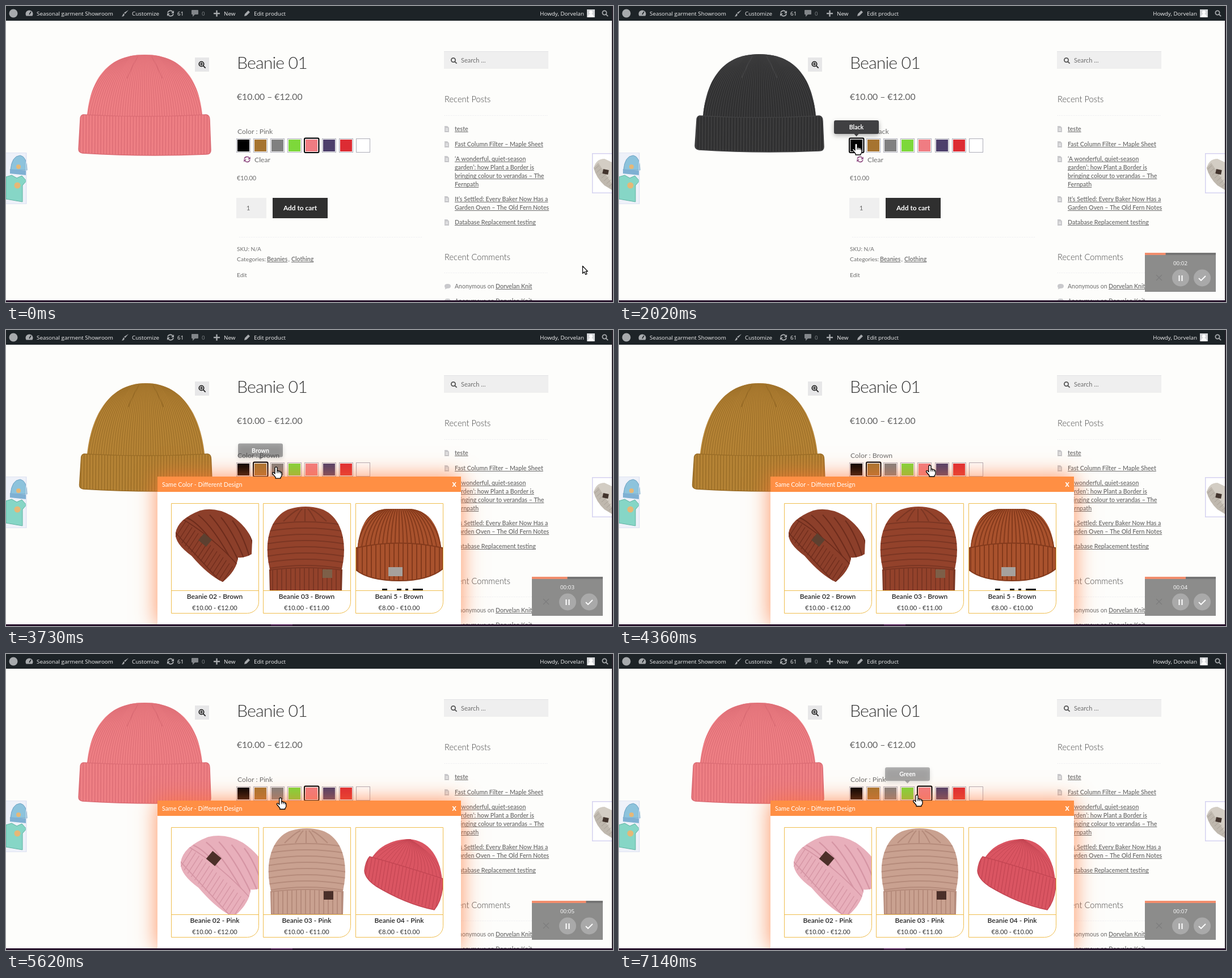
Recreate the animation shown at these times as an HTML page with a canvas. Size 1070x523 px, loop 7.21 s.

```html
<!DOCTYPE html>
<html lang="en">
<head>
<meta charset="utf-8">
<title>Beanie 01</title>
<style>
html, body { margin: 0; width: 100%; height: 100%; overflow: hidden; background: #fdfdfb; }
canvas { display: block; width: 1070px; height: 523px; }
</style>
</head>
<body>
<canvas id="stage" width="1070" height="523"></canvas>
<script>
const ctx = document.getElementById('stage').getContext('2d');
const LOOP = 7210;
const LATO = 'Lato, "Open Sans", sans-serif';
const OPEN = '"Open Sans", "Noto Sans", sans-serif';
const GREY = '#6d6d6d';

// Mouse path: time, x, y
const MOUSE = [
  [0, 1016, 459], [200, 1016, 459], [1050, 446, 262], [1250, 446, 262],
  [1600, 418, 243], [2350, 418, 243], [2950, 455, 243], [3500, 455, 243],
  [4250, 548, 239], [5250, 547, 239], [5950, 431, 267], [6400, 431, 267],
  [6750, 480, 246], [7140, 525, 249], [7210, 529, 249]
];
const PROGRESS = [[0, 4], [1200, 24], [3160, 54], [4360, 72], [5050, 86], [6250, 106], [7130, 125]];
// Tooltips: swatch, start, end
const TIPS = [
  [0, 1550, 2350], [1, 2600, 3650], [2, 3800, 3900], [3, 4000, 4120], [4, 4400, 5350],
  [1, 6480, 6600], [2, 6640, 6830], [3, 6890, 7050]
];
const SWATCHES = [
  ['Black', '#000'], ['Brown', '#a67430'], ['Grey', '#808080'], ['Green', '#7dd83a'],
  ['Pink', '#f07c82'], ['Purple', '#4d3f6b'], ['Red', '#dd2c33'], ['White', '#fff']
];
const MAIN = {
  Pink: [244.5, 86, 102, 193, 116.5, 262, '#ee7f84', '#dc6d75'],
  Black: [247.5, 85, 100, 195, 113.5, 256, '#303031', '#424243'],
  Brown: [246.5, 94, 104, 220, 117, 283, '#b58335', '#9a6d27']
};
const DESIGNS = {
  Black: {
    slouch: { fill: '#202126', rib: '#34353b', patch: '#8a5a3c', x: 302, y: 322, size: 1, mark: 55 },
    tall: ['#2b211d', '#3b2e29', '#8a5a3c', 0, 0], round: ['#14181d', '#272c32']
  },
  Brown: {
    slouch: { fill: '#8c3f2a', rib: '#6d2c1c', patch: '#5c4030', x: 299, y: 316, size: 1, mark: 55 },
    tall: ['#93422b', '#7b3623', '#7d5f48', -7, 0], round: ['#a9522d', '#843a1c']
  },
  Pink: {
    slouch: { fill: '#e8afbb', rib: '#d595a4', patch: '#4d302a', x: 308, y: 320, size: 1.12, mark: 37 },
    tall: ['#c9a190', '#b58b7b', '#4a2f29', -5, -4], round: ['#da5562', '#c44653']
  }
};

const clamp = v => Math.max(0, Math.min(1, v));

function sample(keys, t, ease) {
  let i = 0;
  while (i < keys.length - 2 && t >= keys[i + 1][0]) i++;
  const [a, b] = [keys[i], keys[i + 1]];
  let k = clamp((t - a[0]) / (b[0] - a[0]));
  if (ease) k = k * k * (3 - 2 * k);
  return a.slice(1).map((v, n) => v + (b[n + 1] - v) * k);
}

function rect(x, y, w, h, c) { ctx.fillStyle = c; ctx.fillRect(x, y, w, h); }

function frame(x, y, w, h, c, lw = 1) {
  ctx.strokeStyle = c; ctx.lineWidth = lw;
  ctx.strokeRect(x + lw / 2, y + lw / 2, w - lw, h - lw);
}

function disc(x, y, r, c) {
  ctx.fillStyle = c; ctx.beginPath(); ctx.arc(x, y, r, 0, 7); ctx.fill();
}

function shape(d, fill, stroke, lw = 1) {
  const p = new Path2D(d);
  if (fill) { ctx.fillStyle = fill; ctx.fill(p); }
  if (stroke) { ctx.strokeStyle = stroke; ctx.lineWidth = lw; ctx.stroke(p); }
  return p;
}

function at(x, y, draw, angle = 0, size = 1) {
  ctx.save(); ctx.translate(x, y); ctx.rotate(angle); ctx.scale(size, size); draw(); ctx.restore();
}

// y is the middle of the capitals
function text(s, x, y, size, { w = 400, c = GREY, align = 'left', font = LATO, line = false, gap = 0 } = {}) {
  ctx.font = `${w} ${size}px ${font}`;
  ctx.letterSpacing = gap + 'px';
  ctx.textAlign = align;
  ctx.fillStyle = c;
  const base = y + size * 0.36;
  ctx.fillText(s, x, base);
  if (line) ctx.fillRect(x, Math.round(base + 1), ctx.measureText(s).width, 1);
}

function dotted(x, y, w) {
  ctx.strokeStyle = '#e3e3ea'; ctx.lineWidth = 1; ctx.setLineDash([1, 2]);
  ctx.beginPath(); ctx.moveTo(x, y + 0.5); ctx.lineTo(x + w, y + 0.5); ctx.stroke();
  ctx.setLineDash([]);
}

function lens(x, y, r, c, lw) {
  shape(`M${x + r} ${y}a${r} ${r} 0 1 0 ${-2 * r} 0a${r} ${r} 0 1 0 ${2 * r} 0M${x + r * 0.7} ${y + r * 0.7}l${r} ${r}`, null, c, lw);
}

function arrows(x, y, r, c) {
  at(x, y, () => {
    for (let i = 0; i < 2; i++) {
      shape(`M${-r} -1A${r} ${r} 0 0 1 ${r - 1} -2.5`, null, c, 1.8);
      shape(`M${r + 1} ${-r}v${r}h${-r}z`, c);
      ctx.rotate(Math.PI);
    }
  });
}

function bubble(x, y, c) {
  shape(`M${x - 5} ${y - 5}h10q1 0 1 1v6q0 1 -1 1h-5l-4 4v-4h-1q-1 0 -1 -1v-6q0 -1 1 -1z`, c);
}

function adminBar() {
  const icon = '#a7aaad', opt = { c: '#f0f0f1', font: OPEN };
  rect(0, 0, 1068, 26, '#1d2327');
  disc(13, 13, 7.5, icon);
  shape('M35.5 17.5A6.5 6.5 0 1 1 46.5 17.5z', icon);
  shape('M41 15l3 -5', null, '#1d2327', 1.5);
  text('Seasonal garment Showroom', 54, 13, 9.85, opt);
  shape('M216 7l-6 7l-2 -2zM207 13l2 2q-1 4 -5 3.5q2 -2 3 -5.5z', icon);
  text('Customize', 222, 13, 9.85, opt);
  arrows(290, 13, 5, icon);
  text('61', 302, 13, 9.85, opt);
  bubble(333, 12, '#82868a');
  text('0', 345, 13, 9.85, { c: '#82868a', font: OPEN });
  rect(366, 12, 11, 2.4, icon); rect(370.3, 7.7, 2.4, 11, icon);
  text('New', 384, 13, 9.85, opt);
  shape('M420 18l1 -4l6 -6l3 3l-6 6z', icon);
  text('Edit product', 437, 13, 9.85, opt);
  text('Howdy, Dorvelan', 1019, 13, 9.85, { ...opt, align: 'right' });
  rect(1024, 6, 14, 14, '#d3d5d8');
  disc(1031, 11, 3, '#fff'); shape('M1026 20q0 -6 5 -6t5 6z', '#fff');
  lens(1055, 12, 3.6, icon, 1.8);
}

function mainHat([cx, top, half, base, cuff, bottom, fill, rib]) {
  const crown = `M${cx - half} ${base + 4}C${cx - half + 5} ${base - 55} ${cx - 72} ${top} ${cx} ${top}S${cx + half - 5} ${base - 55} ${cx + half} ${base + 4}z`;
  ctx.save();
  ctx.clip(shape(crown, fill));
  ctx.strokeStyle = rib; ctx.lineWidth = 1.1;
  for (let k = -24; k <= 24; k++) {
    ctx.beginPath();
    ctx.moveTo(cx + k * 1.5, top);
    ctx.quadraticCurveTo(cx + k * 4, top + 40, cx + k * 4.4, base + 4);
    ctx.stroke();
  }
  shape(`M${cx - 12} ${top + 3}Q${cx - 22} ${top + 20} ${cx - 31} ${top + 42}M${cx + 12} ${top + 3}Q${cx + 22} ${top + 20} ${cx + 31} ${top + 42}`, null, rib, 2);
  ctx.restore();
  const l = cx - cuff, r = cx + cuff;
  const band = `M${l + 8} ${base - 1}Q${cx} ${base + 5} ${r - 8} ${base - 1}Q${r - 2} ${base} ${r - 2} ${base + 8}L${r} ${bottom - 7}Q${r} ${bottom} ${r - 8} ${bottom}Q${cx} ${bottom + 5} ${l + 7} ${bottom - 2}Q${l} ${bottom - 3} ${l} ${bottom - 9}L${l + 3} ${base + 7}Q${l + 3} ${base} ${l + 8} ${base - 1}z`;
  ctx.save();
  ctx.clip(shape(band, fill, rib, 1.5));
  ctx.strokeStyle = rib; ctx.lineWidth = 1.5;
  for (let x = l + 3; x < r; x += 5.2) {
    ctx.beginPath(); ctx.moveTo(x, base - 2); ctx.lineTo(x - 0.5, bottom + 5); ctx.stroke();
  }
  ctx.restore();
}

function product(color) {
  mainHat(MAIN[color]);
  rect(333, 91, 25, 25, '#e7e7e8');
  lens(344.5, 102.5, 4.2, '#222', 1.8);
  shape('M342 102.5h5M344.5 100v5', null, '#222', 1.3);
  text('Beanie 01', 407, 100, 30.3, { w: 300, c: '#333', gap: -0.9 });
  text('€10.00 – €12.00', 407, 160, 15.7, { c: '#5f5f5f' });
  text('Color : ' + color, 408, 222, 12.3);
  SWATCHES.forEach(([name, c], i) => {
    const x = Math.round(406 + i * 30.1);
    rect(x, 234, 25, 25, '#fff');
    frame(x, 234, 25, 25, '#adadb8');
    rect(x + 2, 236, 21, 21, c);
    if (name === color) {
      ctx.beginPath(); ctx.roundRect(x, 233.5, 25.5, 25.5, 2);
      ctx.strokeStyle = '#000'; ctx.lineWidth = 2; ctx.stroke();
    }
  });
  arrows(425, 271, 4.8, '#96588a');
  text('Clear', 438, 272, 12.2);
  text('€10.00', 407, 304, 10.9);
  rect(406, 339, 53, 36, '#efefef');
  text('1', 427, 357, 11.5, { align: 'center' });
  rect(470, 339, 97, 36, '#2f2f2f');
  text('Add to cart', 518.5, 357, 11.9, { w: 700, c: '#fff', align: 'center' });
  dotted(411, 408, 323);
  text('SKU: N/A', 407, 429, 10);
  text('Categories:', 407, 447, 10.35);
  text('Beanies', 460, 447, 10.5, { w: 600, line: true });
  text(',', 497.5, 447, 10.5);
  text('Clothing', 503, 447, 10.5, { w: 600, line: true });
  text('Edit', 407, 475, 10.3);
}

function sidebar() {
  rect(772, 80, 184, 31, '#efefef');
  rect(772, 80, 184, 1, '#e2e2e4');
  lens(788.5, 95.5, 3.6, '#555', 1.8);
  text('Search …', 802, 96, 11);
  text('Recent Posts', 773, 165, 14.7, { w: 300, c: '#444' });
  dotted(773, 193, 182);
  [217, 244, 270, 341, 382].forEach(y => {
    shape(`M773 ${y - 5}h5l3 3v8h-8z`, '#c9c9cc');
    rect(775, y - 0.5, 4, 1, '#fff'); rect(775, y + 2, 4, 1, '#fff');
  });
  [
    [217, 'teste'], [244, 'Fast Column Filter – Maple Sheet'],
    [270, '‘A wonderful, quiet-season'], [285, 'garden’: how Plant a Border is'],
    [300, 'bringing colour to verandas – The'], [315, 'Fernpath'],
    [341, 'It’s Settled: Every Baker Now Has a'], [356, 'Garden Oven – The Old Fern Notes'],
    [382, 'Database Replacement testing']
  ].forEach(([y, s]) => text(s, 791, y, 10.65, { w: 600, line: true }));
  text('Recent Comments', 773, 444, 14.7, { w: 300, c: '#444' });
  dotted(773, 471, 182);
  [495, 521].forEach(y => {
    shape(`M773 ${y}q0 -4 5.5 -4t5.5 4t-5.5 4q-2 0 -3 1l-2 .5l1 -2q-1.5 -1.5 -1.5 -3.5z`, '#c9c9cc');
    text('Anonymous on', 791, y + 0.5, 10.5);
    text('Dorvelan Knit', 863, y + 0.5, 10.5, { w: 600, line: true });
  });
}

function sideCards() {
  rect(0, 259, 37, 91, '#eef1f9');
  shape('M8 290q2 -25 17 -26q12 2 12 26z', '#8dc3dc', '#6fa3c4');
  shape('M7 288l29 3v8l-29 -3z', '#7fb0d3');
  disc(22, 284, 4, '#e6b877');
  shape('M0 302l10 -3l9 5l9 -4l8 9l-7 8v29l-29 -5z', '#86d6c6', '#5fb3a2');
  disc(20, 317, 5.5, '#e6b877');
  frame(-1, 259, 37, 91, '#dfe3f2');
  rect(1033, 260, 35, 71, '#fff');
  shape('M1036 286q4 -16 19 -16l13 6v48l-13 -7q-15 -14 -19 -31z', '#d3cdc4');
  shape('M1036 286l8 -9l24 37v11l-13 -8q-15 -14 -19 -31z', '#bfb8ae');
  for (let i = 0; i < 7; i++) shape(`M${1037 + i * 4.3} ${289 + i * 5}l8 -7`, null, '#a8a197', 1);
  at(1057, 293, () => rect(-5, -4, 10, 8, '#42342d'), 0.2);
  frame(1033, 260, 37, 71, '#d5d2f0', 1.5);
}

function slouchHat({ fill, rib, patch, x, y, size, mark }) {
  at(x, y, () => {
    const body = 'M0 43Q4 18 43 3Q70 -4 98 12Q126 31 135 56L134 80Q122 87 110 86Q108 108 83 129Q58 118 28 83Q-2 61 0 43z';
    ctx.save();
    ctx.clip(shape(body, fill));
    for (let i = 0; i < 6; i++) {
      shape(`M${20 + i * 20} ${16 - 6 * Math.sin(i)}Q${50 + i * 17} ${28 + i * 4} ${94 + i * 9} ${104 - i * 5}`, null, rib, 2);
    }
    shape('M-4 38L12 18Q66 50 110 100L83 133z', fill, rib, 1.5);
    for (let i = 0; i < 16; i++) shape(`M${i * 5.5} ${50 + i * 5.3}l18 -28`, null, rib, 1.2);
    ctx.restore();
    at(52, mark, () => rect(-9, -8, 18, 16, patch), 0.7);
  }, 0, size);
}

function tallHat([fill, rib, patch, dx, dy]) {
  at(dx, dy, () => {
    ctx.save();
    ctx.clip(shape('M474 430C458 375 474 326 508 316Q535 308 562 316C598 328 612 375 597 430z', fill));
    for (let y = 340; y < 430; y += 11) {
      shape(`M460 ${y + 6}Q535 ${y - 8} 610 ${y + 6}`, null, rib, 2);
    }
    for (let i = -2; i <= 2; i++) shape(`M${534 + i * 5} 316q${i * 6} 6 ${i * 14} 22`, null, rib, 2);
    ctx.restore();
    ctx.save();
    ctx.clip(shape('M472 424Q535 416 599 424L598 464H473z', fill, rib, 2));
    for (let x = 477; x < 600; x += 8) shape(`M${x} 418V466`, null, rib, 2);
    ctx.restore();
    rect(565, 423, 17, 15, patch);
  });
}

function tiltedHat([fill, rib]) {
  ctx.save();
  ctx.clip(shape('M641 368C655 335 690 327 710 327C745 329 768 358 770 412z', fill));
  for (let i = 0; i < 19; i++) shape(`M712 327Q${660 + i * 7} ${338 + i * 2} ${636 + i * 7.5} ${370 + i * 3}`, null, rib, 1);
  ctx.restore();
  ctx.save();
  ctx.clip(shape('M641 358Q700 374 770 397Q771 432 755 452Q705 442 652 410Q633 397 632 383Q634 366 641 358z', fill, rib, 1.5));
  for (let i = 0; i < 24; i++) shape(`M${640 + i * 6} ${352 + i * 2.2}l-9 55`, null, rib, 1.2);
  ctx.restore();
}

function wideHat([fill, rib]) {
  ctx.save();
  ctx.clip(shape('M619 392Q624 318 672 316H714Q762 322 768 392z', fill));
  for (let i = -11; i <= 11; i++) shape(`M${693 + i * 3} 316Q${693 + i * 7} 340 ${693 + i * 7.5} 395`, null, rib, 2);
  ctx.restore();
  ctx.save();
  ctx.clip(shape('M617 385Q693 368 770 385V422Q745 443 693 443Q640 443 617 424z', fill, rib, 2));
  for (let x = 620; x < 770; x += 8) shape(`M${x} 372V444`, null, rib, 2);
  ctx.restore();
  rect(674, 419, 25, 16, '#a6a19d');
  [[663, 9], [689, 8], [704, 5], [717, 18]].forEach(([x, w]) => rect(x, 457, w, 3, '#222'));
}

function popup(color, k) {
  const d = DESIGNS[color], brown = color === 'Brown';
  ctx.save();
  ctx.globalAlpha = k;
  ctx.translate(0, (1 - k) * 40);
  ctx.save();
  ctx.shadowColor = 'rgba(255,115,50,.78)'; ctx.shadowBlur = 36;
  rect(267, 259, 535, 262, '#fff');
  ctx.restore();
  rect(267, 259, 535, 27, '#ff8f44');
  text('Same Color - Different Design', 275, 273, 10.75, { c: '#fff' });
  text('X', 790, 273, 10.5, { w: 900, c: '#fff', align: 'center' });
  const hats = [
    () => slouchHat(d.slouch), () => tallHat(d.tall),
    () => (brown ? wideHat : tiltedHat)(d.round)
  ];
  const names = ['Beanie 02', 'Beanie 03', brown ? 'Beani 5' : 'Beanie 04'];
  const prices = ['€10.00 - €12.00', '€10.00 - €11.00', '€8.00 - €10.00'];
  [291, 453, 616].forEach((x, i) => {
    ctx.save();
    ctx.beginPath(); ctx.rect(x, 306, 154, 154); ctx.clip();
    hats[i]();
    ctx.restore();
    ctx.beginPath(); ctx.roundRect(x + 0.5, 306.5, 154, 194, [0, 0, 20, 0]);
    ctx.strokeStyle = '#efbd4d'; ctx.lineWidth = 1; ctx.stroke();
    rect(x, 460, 154, 1, '#efbd4d');
    text(`${names[i]} - ${color}`, x + 77, 471, 12, { w: 600, c: '#222', align: 'center' });
    text(prices[i], x + 77, 491, 11.1, { c: '#333', align: 'center' });
  });
  ctx.restore();
}

function tooltip(i, alpha) {
  const x = Math.round(418 + i * 30.1), y = 202 - 3 * (1 - alpha);
  ctx.save();
  ctx.globalAlpha = alpha;
  ctx.save();
  ctx.shadowColor = 'rgba(0,0,0,.3)'; ctx.shadowBlur = 8; ctx.shadowOffsetY = 3;
  ctx.beginPath(); ctx.roundRect(x - 39, y, 79, 24, 3);
  ctx.fillStyle = '#404042'; ctx.fill();
  ctx.restore();
  shape(`M${x - 4} ${y + 23.5}h9l-4.5 5z`, '#404042');
  // the label stays white while the box fades
  ctx.globalAlpha = 1;
  text(SWATCHES[i][0], x + 0.5, y + 12.5, 10.5, { w: 700, c: '#fff', align: 'center' });
  ctx.restore();
}

function recorder(t) {
  const [w] = sample(PROGRESS, t);
  ctx.save();
  ctx.globalAlpha = clamp((t - 300) / 150);
  rect(927, 436, 125, 69, 'rgba(125,125,125,.88)');
  rect(927, 436, 125, 4, '#747474');
  rect(927, 436, w, 4, '#f28d6c');
  text('00:0' + Math.floor(w / 125 * 7), 989.5, 454, 9.8, { c: '#fff', align: 'center', font: OPEN });
  shape('M947 475l10 10M957 475l-10 10', null, '#7d7d7d', 1.2);
  disc(990, 480.5, 15, '#a9a9a9'); disc(1028, 480.5, 15, '#a9a9a9');
  rect(986.5, 476, 2, 10, '#fff'); rect(991.5, 476, 2, 10, '#fff');
  shape('M1022 481l4 4l8 -8', null, '#fff', 1.8);
  ctx.restore();
}

function cursor(x, y, hand) {
  at(x, y, () => {
    ctx.lineJoin = 'round';
    if (hand) {
      shape('M-2 2Q-2 0 0 0T2 2V8Q2 6.5 3.5 6.5T5 8Q5.5 7 7 7.5T8 9Q10 8.5 10 11V15Q10 17 8 18.5V20H-1V18L-6 12Q-7 10 -5.5 9.5Q-4 9 -2 12z', '#fff', '#000', 1.3);
      shape('M2 8V11M5 8V11M8 9V11.5', null, '#000', 1);
    } else {
      shape('M.5 .5V13.5L3.5 10.7L5.7 15.5L8 14.5L5.9 9.8H9.5z', '#fff', '#000', 1.2);
    }
  });
}

function draw(t) {
  const color = t < 1900 ? 'Pink' : t < 3450 ? 'Black' : t < 4650 ? 'Brown' : 'Pink';
  const set = t < 3650 ? 'Black' : t < 4800 ? 'Brown' : 'Pink';
  const [x, y] = sample(MOUSE, t, true);
  rect(0, 0, 1070, 523, '#fdfdfb');
  sidebar();
  product(color);
  sideCards();
  const open = clamp((t - 2050) / 200);
  if (open) popup(set, open);
  TIPS.forEach(([i, from, to]) => {
    const a = Math.min(clamp((t - from) / 150), clamp((to + 150 - t) / 150));
    if (a) tooltip(i, a);
  });
  adminBar();
  rect(1068, 0, 2, 523, '#26202a');
  rect(0, 520, 1070, 3, '#26132b');
  if (open) rect(467, 520, 38, 2, '#572a5c');
  if (t > 300) recorder(t);
  const onSwatch = x > 405 && x < 643 && y > 233 && y < 259;
  const onClear = !open && x > 417 && x < 467 && y >= 259 && y < 281;
  cursor(x, y, onSwatch || onClear);
}

function tick(now) {
  draw(now % LOOP);
  requestAnimationFrame(tick);
}
requestAnimationFrame(tick);
</script>
</body>
</html>
```
